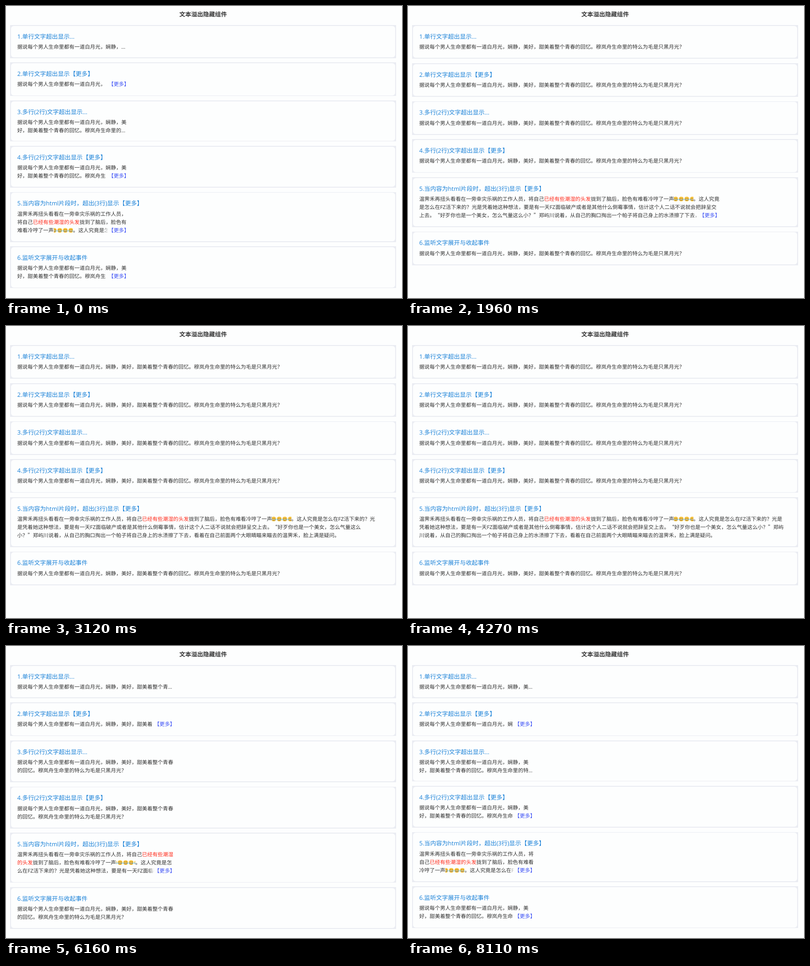
These frames come from a looping animation (870 px wide and 643 px high, 8.19 s). An HTML page:

```html
<!DOCTYPE html>
<html lang="zh-CN">
<head>
<meta charset="utf-8">
<title>文本溢出隐藏组件</title>
<style>
  html, body { margin: 0; width: 100%; height: 100%; overflow: hidden; background: #fdfefe; }
  body {
    position: relative; color: #333; font: 11.43px/18px "Open Sans", "Noto Sans CJK SC", "Noto Sans CJK", sans-serif;
    text-rendering: geometricPrecision; text-spacing-trim: space-all; font-kerning: none;
  }
  h1, h2 { margin: 0; font-size: 13.06px; line-height: 18px; }
  h1 { position: absolute; top: 9px; width: 866px; text-align: center; }
  h2 { margin-bottom: 6.2px; font-weight: 400; color: #1b82d8; }
  main { position: absolute; left: 9px; top: 42.3px; width: 848px; }
  section {
    position: relative; isolation: isolate; box-sizing: border-box;
    margin-bottom: 9.8px; padding: 15.7px 15.7px 16px; background: #eaecf2; overflow: hidden;
  }
  section::before {
    content: ""; position: absolute; inset: 1.7px; z-index: -1;
    border-radius: 6px; background: #fdfefe;
  }
  .text { position: relative; width: var(--w); }
  .text i, .text b { display: none; }
  .cut { height: calc(var(--n) * 18px); overflow: hidden; }
  .dots.cut {
    display: -webkit-box; -webkit-box-orient: vertical; -webkit-line-clamp: var(--n);
    margin-bottom: -1.65px;
  }
  /* The spacer pushes the floated link down to the last line. */
  .cut i { display: block; float: right; width: 0; height: calc((var(--n) - 1) * 18px); }
  .cut b { display: block; float: right; clear: both; font-weight: 400; color: #3c50f5; }
  .fade.cut b { position: absolute; right: 0; bottom: 0; background: #fdfefe; }
  .fade b::before {
    content: ""; position: absolute; right: 100%; width: 12px; height: 18px;
    background: linear-gradient(90deg, #fdfefe00, #fdfefe);
  }
  em { font-style: normal; color: #ff2a1a; }
  q { quotes: none; line-height: 0; font-family: "Noto Sans CJK SC", "Noto Sans CJK", sans-serif; }
  .laugh { white-space: nowrap; }
  .laugh span {
    display: inline-block; width: 42.6px; height: 12px; vertical-align: -2px;
    background:
      radial-gradient(ellipse 1.3px 1.7px at 2.1px 7.2px, #4fb0ea 70%, #0000),
      radial-gradient(ellipse 1.3px 1.7px at 10.1px 7.2px, #4fb0ea 70%, #0000),
      radial-gradient(ellipse 1.3px .8px at 4.2px 4.6px, #7a5420 60%, #0000),
      radial-gradient(ellipse 1.3px .8px at 8px 4.6px, #7a5420 60%, #0000),
      radial-gradient(ellipse 2.2px .7px at 6.1px 7.1px, #fff 70%, #0000),
      radial-gradient(ellipse 2.6px 1.8px at 6.1px 7.8px, #7a5420 70%, #0000),
      radial-gradient(circle at 6.1px 6px, #fbcb42 4.4px, #f3b437 5px, #f3b43700 5.5px);
    background-size: 12.2px 12px;
  }
</style>
</head>
<body>
<h1>文本溢出隐藏组件</h1>
<main></main>
<script>
const LOOP = 8190, LINE = 18;

const moon = "据说每个男人生命里都有一道白月光，娴静，美好，甜美着整个青春的回忆。穆岚舟生命里的特么为毛是只黑月光？";
const story = "温霁禾再扭头看看在一旁幸灾乐祸的工作人员，将自己<em>已经有些潮湿的头发</em>拢到了脑后，"
  + "脸色有难看冷哼了一声<span class='laugh'><span></span>。</span>这人究竟是怎么在FZ活下来的？光是凭着她这种想法，"
  + "要是有一天FZ面临破产或者是其他什么倒霉事情，估计这个人二话不说就会把辞呈交上去。"
  + "<q>“好歹你也是一个美女，怎么气量这么小？”</q>郑屿川说着，从自己的胸口掏出一个帕子将自己身上的水渍擦了下去，"
  + "看着在自己前面两个大眼睛瞄来瞄去的温霁禾，脸上满是疑问。";

// title, overflow style, line limit, content
const cards = [
  ["单行文字超出显示...", "dots", 1, moon],
  ["单行文字超出显示【更多】", "more", 1, moon],
  ["多行(2行)文字超出显示...", "dots", 2, moon],
  ["多行(2行)文字超出显示【更多】", "more", 2, moon],
  ["当内容为html片段时，超出(3行)显示【更多】", "fade", 3, story],
  ["监听文字展开与收起事件", "more", 2, moon],
];

// time in ms, step number, text width
const drag = [
  [0, 0, 246], [960, 7, 381], [1960, 14, 661], [2220, 16, 705], [3120, 23, 787.5],
  [3270, 24, 799], [3840, 28, 815], [4270, 31, 805], [4420, 32, 796], [5530, 40, 470],
  [6160, 45, 346.8], [6670, 49, 291], [7720, 57, 243], [8110, 60, 255], [LOOP, 61, 255],
];

const main = document.querySelector("main");
main.innerHTML = cards.map(([title, style, lines, content], i) => {
  const link = style === "dots" ? "" : "<i></i><b>【更多】</b>";
  return `<section><h2>${i + 1}.${title}</h2>
    <div class="text ${style}" style="--n:${lines}">${link}${content}</div></section>`;
}).join("");
const texts = [...main.querySelectorAll(".text")];
const laugh = main.querySelector(".laugh span");

// The width moves in discrete steps, as if dragged.
function widthAt(time) {
  const next = drag.findIndex(([t]) => t > time);
  const [t0, s0, w0] = drag[next - 1], [t1, s1, w1] = drag[next];
  const steps = s1 - s0;
  const done = Math.floor((time - t0) / (t1 - t0) * steps + 1e-6) / steps;
  return w0 + (w1 - w0) * done;
}

function layout(width) {
  main.style.setProperty("--w", width + "px");
  texts.forEach((text, i) => {
    text.classList.remove("cut");
    text.classList.toggle("cut", text.offsetHeight > (cards[i][2] + 0.5) * LINE);
  });
  const line = Math.floor(laugh.offsetTop / LINE);
  laugh.style.backgroundPositionX = line * 4.5 - 2 + "px";
}

let shown;
function tick() {
  const width = widthAt(performance.now() % LOOP);
  if (width !== shown) layout(shown = width);
  requestAnimationFrame(tick);
}
tick();
</script>
</body>
</html>
```
